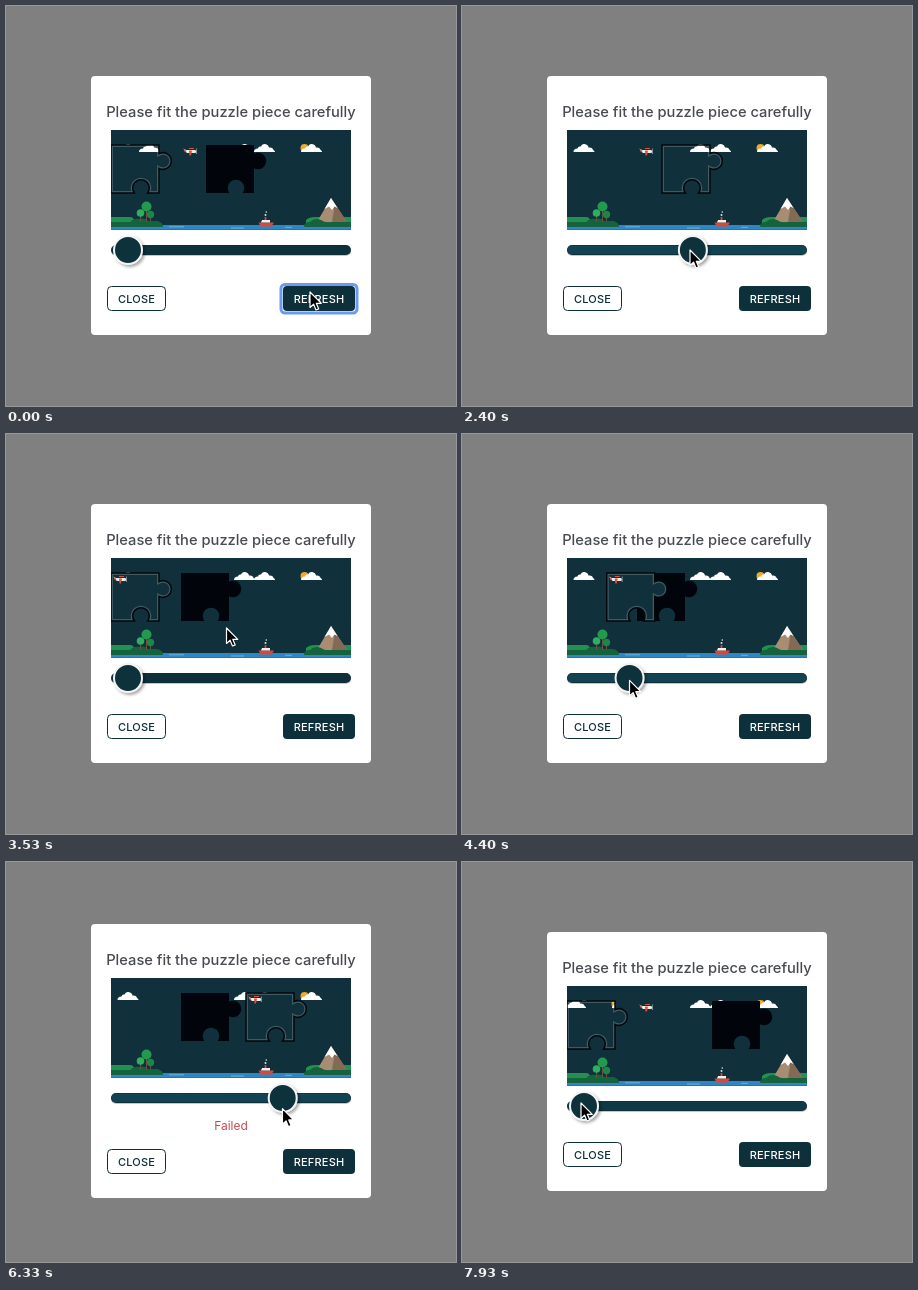
These frames come from a looping animation (450 px wide and 400 px high, 8 s). An HTML page:

```html
<!DOCTYPE html>
<html lang="en">
<head>
<meta charset="utf-8">
<title>Slider puzzle</title>
<style>
  html, body { margin: 0; width: 100%; height: 100%; overflow: hidden; background: #fff; }
  svg { display: block; width: 450px; height: 400px; }
  text { font-family: Inter, "Open Sans", sans-serif; text-anchor: middle; }
  .btn { font-size: 11px; font-weight: 500; letter-spacing: .2px; }
</style>
</head>
<body>
<svg viewBox="0 0 450 400">
  <defs>
    <path id="jig" d="M0 0H48V8.7A8.3 8.3 0 1 1 48 23.3V48H36.6A8.3 8.3 0 1 0 23.4 48H0Z"/>
    <clipPath id="cut"><use href="#jig"/></clipPath>
    <clipPath id="frame"><rect width="240" height="100"/></clipPath>
    <filter id="drop" x="-50%" y="-50%" width="200%" height="200%">
      <feDropShadow dx="2" dy="2" stdDeviation="1.8" flood-opacity=".35"/>
    </filter>
    <filter id="glow" x="-10%" y="-20%" width="120%" height="140%">
      <feGaussianBlur stdDeviation=".6"/>
    </filter>

    <path id="cloud" fill="#fff" d="M0 8.5Q0 5 4 5Q4.500 2.500 7 3Q8 0 11 0.500Q14.500 1 15 4Q19 3.500 19.500 6.500Q21 7 21 8.500Z"/>
    <g id="scene">
      <rect width="240" height="100" fill="#10303b"/>
      <use href="#cloud" x="6.500" y="13.500"/>
      <use href="#cloud" x="123" y="13.500"/>
      <use href="#cloud" x="143" y="13.500"/>
      <circle cx="193.500" cy="18" r="4" fill="#f0a92e"/>
      <use href="#cloud" x="190" y="13.500"/>
      <g>
        <path d="M72.500 18.500L75 20H84Q86 21 84.500 23H76Q73.500 22 72.500 18.500Z" fill="#f1ece8"/>
        <path d="M72.500 18.500L75.500 21L74 22.500Z M78 20.500H81L80 25.500H78.500Z" fill="#d6533f"/>
        <path d="M78 18.500H83" stroke="#d6533f"/>
        <path d="M85.500 18.500V24" stroke="#a8b0b3" stroke-width=".7"/>
      </g>
      <rect y="95" width="240" height="5" fill="#2c87c4"/>
      <path d="M0 99.500H240" stroke="#2474ad"/>
      <path d="M58 96.800H73M174 97.300H181M120 98H133" stroke="#79bde5" stroke-width=".8"/>
      <path d="M0 87H19Q23 87 23 91V96H0Z" fill="#23904f"/>
      <path d="M0 92H19Q23 87.500 29 89Q33 87.500 37 91H46Q52 92 52 97H0Z" fill="#14633d"/>
      <path d="M29.500 92V83M35.500 92V76M39.500 91V85" stroke="#6d5140" stroke-width="1.100"/>
      <circle cx="35.500" cy="76.500" r="5" fill="#25984f"/>
      <circle cx="29.500" cy="83" r="3.800" fill="#2fae62"/>
      <circle cx="39.500" cy="84.500" r="3.700" fill="#1d8547"/>
      <path d="M195 90Q198 87 204 87H240V96H195Z" fill="#23904f"/>
      <path d="M220 68L236 92H206Z" fill="#a98d72"/>
      <path d="M220 68L236 92H221L223 80Z" fill="#836a55"/>
      <path d="M220 68L226.500 78L223.500 76.500L221 80L218 76.500L213.500 79Z" fill="#fff"/>
      <path d="M193 97Q193 92 199 92Q204 87 210 90Q214 93 220 92H240V97Z" fill="#14633d"/>
      <path d="M147.500 92.500H163L160.500 96.500H149.500Z" fill="#d9463a"/>
      <path d="M151 90H159V92.500H150Z" fill="#f3f0ec"/>
      <path d="M154.500 90V87" stroke="#d9463a" stroke-width="1.800"/>
      <circle cx="154.500" cy="85" r="1" fill="#d9e2e5"/>
      <circle cx="155.300" cy="82" r=".8" fill="#d9e2e5"/>
    </g>
  </defs>

  <g id="modal">
    <rect width="450" height="400" fill="#808080"/>
    <rect id="card" x="85" width="280" rx="4" fill="#fff"/>
    <g id="top">
      <text x="225" y="111" font-size="14.7" font-weight="500" fill="#484b50">Please fit the puzzle piece carefully</text>
      <g transform="translate(105 124)" clip-path="url(#frame)">
        <use href="#scene"/>
        <use id="hole" href="#jig" fill="#01050b"/>
        <g id="piece">
          <g clip-path="url(#cut)">
            <use id="part" href="#scene"/>
            <use href="#jig" fill="none" stroke="#fff" stroke-opacity=".2" stroke-width="4"/>
          </g>
          <use href="#jig" fill="none" stroke="#02080c" stroke-width="1.500"/>
        </g>
      </g>
      <rect x="105" y="240" width="240" height="10" rx="5" fill="#000" opacity=".22"/>
      <rect x="105" y="239" width="240" height="10" rx="5" fill="#0e303b"/>
      <rect id="lit" x="105.500" y="239.500" width="239" height="8.500" rx="4.300" fill="#134252"/>
      <circle id="knob" cy="244" r="14" fill="#0e303b" stroke="#f4f4f4" stroke-width="2" filter="url(#drop)"/>
    </g>
    <text id="fail" x="225" y="268" font-size="12" fill="#cb4b50">Failed</text>
    <g id="foot">
      <rect x="101.500" y="280.500" width="58" height="24" rx="4" fill="#fff" stroke="#0e303b"/>
      <text class="btn" x="130.500" y="297" fill="#0e303b">CLOSE</text>
      <rect id="ring" x="275" y="278.500" width="76" height="28.500" rx="4" fill="none" stroke="#6b9bf0" stroke-width="3" filter="url(#glow)"/>
      <rect x="277" y="280" width="72" height="25" rx="4" fill="#0e303b"/>
      <text class="btn" x="313" y="297" fill="#fff">REFRESH</text>
    </g>
  </g>
  <path id="arrow" d="M0 0V15.500L3.600 12.200L6 18L8.700 16.900L6.300 11.300H11.300Z" fill="#000" stroke="#fff" stroke-width="1.200" stroke-linejoin="round"/>
</svg>
<script>
const LOOP = 8000;
const CLOSE = 2600, OPEN = 3470, FAIL = 5200, RESET = 6930;
const $ = id => document.getElementById(id);
const clamp = v => Math.max(0, Math.min(1, v));
const smooth = u => u * u * (3 - 2 * u);
const within = (t, a, b) => t >= a && t < b;
const show = (id, on) => $(id).setAttribute('visibility', on ? 'inherit' : 'hidden');
const move = (id, x, y) => $(id).setAttribute('transform', `translate(${x} ${y})`);

// time, x, y of the pointer tip
const pointer = [
  [0, 304, 286], [70, 304, 286], [800, 122, 241], [1130, 122, 241],
  [1730, 145, 242], [2400, 228, 244], [3070, 228, 244], [3450, 220.5, 194],
  [3760, 220.5, 194], [4150, 122, 245], [4230, 122, 245], [4600, 220.5, 248],
  [4870, 271, 249], [4930, 276, 249], [5070, 276, 249], [5400, 276, 246],
  [6290, 276, 246], [6860, 307, 291], [7220, 307, 291], [7880, 119, 241]
];

// time, piece offset
const drags = [
  [1130, 0], [1730, 21], [2370, 95], [OPEN - 1, 95], [OPEN, 0],
  [4230, 0], [4600, 86], [4870, 130], [4930, 135], [RESET - 1, 135], [RESET, 0]
];

function track(keys, t, i, ease) {
  const n = keys.findIndex(k => k[0] > t);
  if (n < 0) return keys[keys.length - 1][i];
  if (n === 0) return keys[0][i];
  const a = keys[n - 1], b = keys[n];
  return a[i] + (b[i] - a[i]) * ease((t - a[0]) / (b[0] - a[0]));
}

const isDrag = t => within(t, 1130, 2400) || within(t, 4230, 5000);
const linear = u => u;

function glide(t) {
  if (t < 1130) return linear;
  if (t < 1730) return u => u * u;
  if (t < 2400) return u => 1 - (1 - u) ** 1.7;
  return isDrag(t) ? linear : smooth;
}

function hover(t) {
  const fade = (on, off) => clamp((t - on) / 150) - clamp((t - off) / 150);
  return fade(720, CLOSE) + fade(4050, 6400) + fade(7860, LOOP);
}

function draw(t) {
  show('modal', !within(t, CLOSE, OPEN));
  const failed = within(t, FAIL, RESET);
  $('card').setAttribute('y', failed ? 62 : 70);
  $('card').setAttribute('height', failed ? 274 : 259);
  move('top', 0, failed ? -8 : 0);
  move('foot', 0, failed ? 7 : 0);
  show('fail', failed);
  show('ring', t < 870 || within(t, RESET, 7900));

  const gap = t < OPEN ? 95 : t < RESET ? 70 : 145;
  const off = track(drags, t, 1, glide(t));
  move('hole', gap, 15);
  move('piece', off, 15);
  move('part', -gap, -15);
  $('knob').setAttribute('cx', 122 + off * 1.146);
  $('lit').setAttribute('opacity', hover(t));

  const ease = isDrag(t) ? glide(t) : smooth;
  move('arrow', track(pointer, t, 1, ease), track(pointer, t, 2, ease));
}

function tick() {
  draw(performance.now() % LOOP);
  requestAnimationFrame(tick);
}
tick();
</script>
</body>
</html>
```
